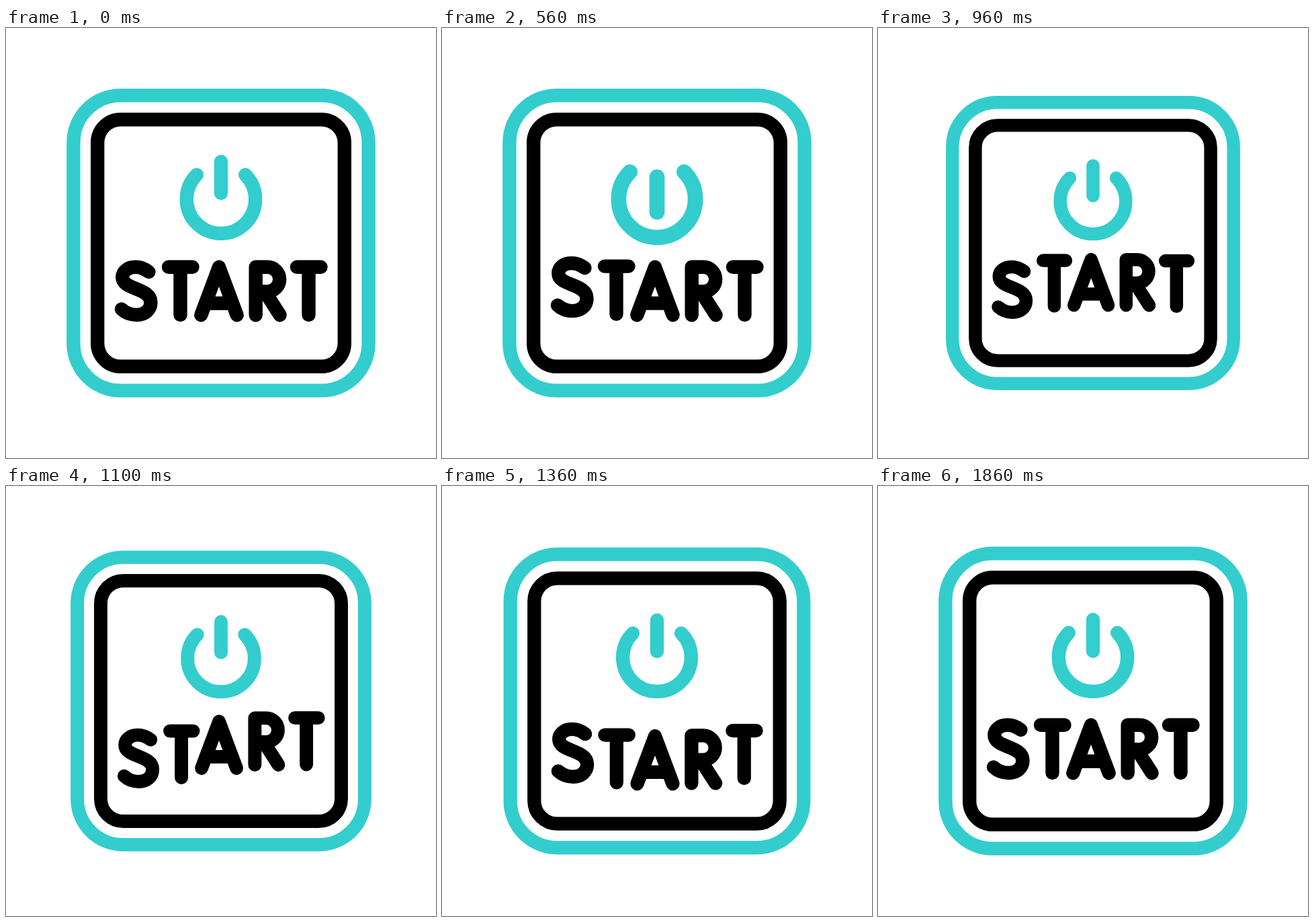
An HTML page with a canvas that plays this animation: 640x640 px, repeating every 2420 ms.

```html
<!DOCTYPE html>
<html lang="en">
<head>
<meta charset="utf-8">
<title>Start button</title>
<style>
  html, body { margin: 0; width: 100%; height: 100%; overflow: hidden; background: #fff; }
  canvas { display: block; width: 100vmin; height: 100vmin; }
</style>
</head>
<body>
<canvas id="stage" width="640" height="640"></canvas>
<script>
const ctx = document.getElementById('stage').getContext('2d');
const LOOP = 2420, STEP = 20, STAGGER = 90;
const TEAL = '#33cdce', BLACK = '#000';

const tee = x => new Path2D(`M${x - 17.5} 355.8H${x + 18}M${x} 355.8V427`);
const letters = [
  new Path2D('M212.5 363C205 357.3 199 355.8 192.5 355.8C182 355.8 173.3 362 173.3 371' +
    'C173.3 390 215.5 386 215.5 408.5C215.5 420 206 427 194.5 427C185 427 178 424 172 418.5'),
  tee(259.5),
  new Path2D('M290.3 427.2L317 355.8L343.7 427.2M298 409.7H336'),
  new Path2D('M371.7 427.2V355.8H389a18.2 18.2 0 0 1 0 36.4H371.7M387 395L407.7 427.2'),
  tee(450.5)
];

const progress = (t, a, b) => Math.min(1, Math.max(0, (t - a) / (b - a)));

const cubic = u => u < 0.5 ? 4 * u ** 3 : 1 - 4 * (1 - u) ** 3;

// Bezier ease (.25, 0, .25, 1), solved by bisection.
function settle(u) {
  let lo = 0, hi = 1;
  for (let i = 0; i < 24; i++) {
    const s = (lo + hi) / 2;
    if (0.75 * s * (1 - s) + s ** 3 < u) lo = s; else hi = s;
  }
  return lo * lo * (3 - 2 * lo);
}

// Up, down past the baseline, back to rest.
const hop = t =>
  -10 * cubic(progress(t, 345, 750)) +
  26.7 * cubic(progress(t, 775, 1165)) -
  16.7 * cubic(progress(t, 1165, 1525));

function box(half, radius, color) {
  ctx.strokeStyle = color;
  ctx.beginPath();
  ctx.roundRect(320 - half, 320 - half, half * 2, half * 2, radius);
  ctx.stroke();
}

function power(press) {
  const scale = 1 + 0.115 * press;
  ctx.save();
  ctx.strokeStyle = TEAL;
  ctx.translate(320, 254.7);
  ctx.scale(scale, scale);
  ctx.beginPath();
  ctx.arc(0, 0, 51.2, -Math.PI / 4, Math.PI * 1.25);
  ctx.stroke();
  const dy = 29.3 * press / scale;
  ctx.beginPath();
  ctx.moveTo(0, -55.8 + dy);
  ctx.lineTo(0, -9 + dy);
  ctx.stroke();
  ctx.restore();
}

function draw(t) {
  const press = settle(progress(t, 20, 560)) - settle(progress(t, 560, 1020));
  const dip = cubic(progress(t, 560, 660)) - settle(progress(t, 660, 1660));
  const scale = 1 - 0.09 * dip;

  ctx.fillStyle = '#fff';
  ctx.fillRect(0, 0, 640, 640);
  ctx.save();
  ctx.translate(320, 320);
  ctx.scale(scale, scale);
  ctx.translate(-320, -320);
  ctx.lineWidth = 20.4;
  ctx.lineCap = ctx.lineJoin = 'round';

  box(219.6, 70, TEAL);
  box(183.8, 34.5, BLACK);
  power(press);

  ctx.strokeStyle = BLACK;
  letters.forEach((path, i) => {
    ctx.save();
    ctx.translate(0, hop(t - i * STAGGER));
    ctx.stroke(path);
    ctx.restore();
  });
  ctx.restore();
}

const start = performance.now();
function tick() {
  const t = (performance.now() - start) % LOOP;
  draw(Math.floor(t / STEP) * STEP);
  requestAnimationFrame(tick);
}
tick();
</script>
</body>
</html>
```
